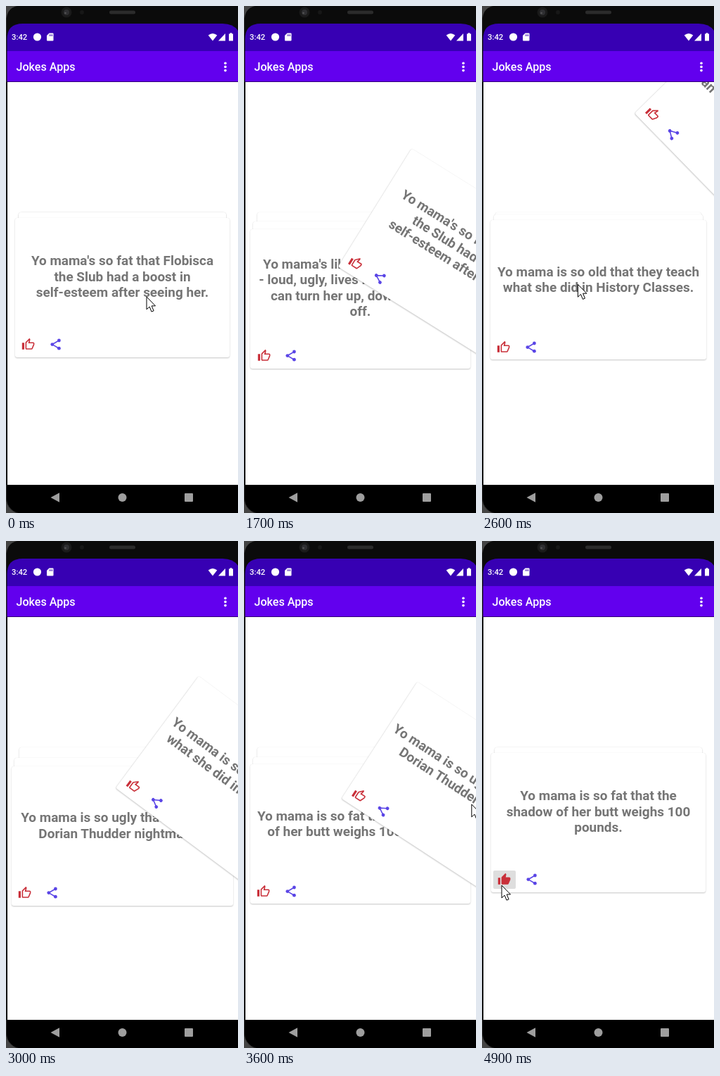
Animation, 330 px wide and 720 px high, one loop 5 s. Source, as an HTML page:

```html
<!DOCTYPE html>
<html lang="en">
<head>
<meta charset="utf-8">
<title>Joke cards</title>
<style>
  html, body { margin: 0; width: 100%; height: 100%; overflow: hidden; background: #444; }
  #stage { position: relative; width: 330px; height: 720px; overflow: hidden; font-family: Roboto, sans-serif; }
  #chrome, #cursor { position: absolute; left: 0; top: 0; overflow: visible; }
  #app { position: absolute; left: 1.5px; top: 107.5px; width: 328.5px; height: 572px; background: #fff; overflow: hidden; isolation: isolate; }
  /* deck shares the stage's coordinates */
  #deck { position: absolute; left: -1.5px; top: -107.5px; }
  .card {
    position: absolute; height: 198px; background: #fff; border-radius: 3px;
    box-shadow: 0 1px 2px rgba(0, 0, 0, .22), 0 0 1px rgba(0, 0, 0, .08);
  }
  .joke {
    position: absolute; left: 0; right: 0; top: 84.3px; transform: translateY(-50%);
    font-weight: 700; font-size: 18.95px; line-height: 22.5px;
    color: #757575; text-align: center; white-space: pre;
  }
  .card svg { position: absolute; top: 170.4px; width: 19.2px; height: 19.2px; }
  .like { left: 9.4px; fill: #c9303a; }
  .share { left: 48px; fill: #5a45e6; stroke: #5a45e6; }
  .press { position: absolute; left: 3px; top: 167px; width: 32px; height: 26px; border-radius: 2px; background: #dedede; visibility: hidden; }
</style>
</head>
<body>
<div id="stage">
  <svg id="chrome" width="330" height="720">
    <rect x=".5" y="-1" width="360" height="722" rx="22" stroke="#262626"/>
    <path d="M1 40V20Q1 0 21 0H330V40Z" fill="#0b0b0b"/>
    <circle cx="86" cy="9" r="7.5" fill="#1a1a1a"/>
    <circle cx="86" cy="9" r="4" fill="#2f2f32"/>
    <circle cx="84.5" cy="10" r="1.3" fill="#555"/>
    <circle cx="108" cy="9" r="3" fill="#171717"/>
    <rect x="147" y="6.5" width="37" height="5" rx="2.5" fill="#2b2b2b"/>
    <path d="M1.5 64V47Q1.5 25 24 25H308Q323 25 330 35V64Z" fill="#3700b3"/>
    <path d="M1.5 64H330V107.5H1.5Z" fill="#6200ee"/>
    <g fill="#fff" font-weight="500">
      <text x="8" y="48" font-size="11.3">3:42</text>
      <circle cx="44.5" cy="44" r="5.6"/>
      <path d="M61.5 38.5H66.5Q67.5 38.5 67.5 39.5V48.5Q67.5 49.5 66.5 49.5H59Q58 49.5 58 48.5V42Z"/>
      <path d="M62 40.3V42.8M63.8 40.3V42.8M65.6 40.3V42.8" stroke="#3700b3" stroke-width=".9"/>
      <path d="M287.7 41.5Q294 36.5 300.3 41.5L294 49.5Z"/>
      <path d="M302 49.5L312 39V49.5Z"/>
      <path d="M317 39.5H318.7V38.3H321.3V39.5H323V49.5H317Z"/>
      <text x="14.5" y="92" font-size="16.1">Jokes Apps</text>
      <circle cx="312" cy="81.2" r="1.8"/>
      <circle cx="312" cy="86.4" r="1.8"/>
      <circle cx="312" cy="91.6" r="1.8"/>
    </g>
    <g fill="#9e9e9e">
      <path d="M63.5 698L76 691.3V704.7Z"/>
      <circle cx="165.5" cy="698" r="6"/>
      <rect x="254" y="692" width="12" height="12" rx="1"/>
    </g>
  </svg>
  <div id="app"><div id="deck"></div></div>
  <svg id="cursor" width="14" height="23">
    <path d="M.5 .5V18.4L4.6 14.6 7.5 21.6 10.6 20.3 7.7 13.4H13Z" fill="#fff" stroke="#000"/>
  </svg>
</div>
<script>
const LOOP = 5000, STEP = 100;

const jokes = [
  "Yo mama's so fat that Flobisca\nthe Slub had a boost in\nself-esteem after seeing her.",
  "Yo mama's like a set of speakers\n- loud, ugly, lives in a box, and you\ncan turn her up, down, on, and\noff.",
  "Yo mama is so old that they teach\nwhat she did in History Classes.",
  "Yo mama is so ugly that she gives\nDorian Thudder nightmares.",
  "Yo mama is so fat that the\nshadow of her butt weighs 100\npounds.",
  "", ""
];
const wideJoke = "Yo mama is so fat that the shadow\nof her butt weighs 100 pounds.";
const lastCard = 4;

const thumbLine = "M9 21h9c.83 0 1.54-.5 1.84-1.22l3.02-7.05c.09-.23.14-.47.14-.73v-2c0-1.1-.9-2-2-2h-6.31l.95-4.57.03-.32c0-.41-.17-.79-.44-1.06L14.17 1 7.58 7.59C7.22 7.95 7 8.45 7 9v10c0 1.1.9 2 2 2zM9 9l4.34-4.34L12 10h9v2l-3 7H9V9zM1 9h4v12H1z";
const thumbFull = "M1 21h4V9H1v12zm22-11c0-1.1-.9-2-2-2h-6.31l.95-4.57.03-.32c0-.41-.17-.79-.44-1.06L14.17 1 7.59 7.59C7.22 7.95 7 8.45 7 9v10c0 1.1.9 2 2 2h9c.83 0 1.54-.5 1.84-1.22l3.02-7.05c.09-.23.14-.47.14-.73v-2z";

// reach: how far the card is dragged before it is flung
const swipes = [
  { start: 1500, end: 1900, reach: 150, pace: 1.5 },
  { start: 2100, end: 2700, reach: 172, pace: 1 },
  { start: 2700, end: 3300, reach: 172, pace: 1 },
  { start: 3300, end: 3800, reach: 155, pace: 1 }
];

// Left and top of each place in the deck, at rest and with the top card dragged away.
const rest = [[13, 301], [18, 293], [19, 293], [19, 293]];
const lifted = [[8, 320], [12, 308], [19, 293]];

// Time, x, y where the pointer turns or stops.
const stops = [
  [0, 200, 413], [200, 200, 413], [600, 89, 385], [900, 85, 385], [1500, 268, 395],
  [1900, 113, 398], [3600, 113, 398], [3800, 261, 360], [4300, 23, 491],
  [4400, 23, 491], [4500, 28, 489], [LOOP, 28, 489]
];

const lerp = (a, b, k) => a + (b - a) * k;
const mix = (a, b, k) => a.map((v, i) => lerp(v, b[i], k));

const cards = jokes.map((joke, i) => {
  const el = document.createElement("div");
  el.className = "card";
  el.style.zIndex = jokes.length - i;
  el.innerHTML = `<div class="joke">${joke}</div><div class="press"></div>
    <svg class="like" viewBox="0 0 24 24"><path d="${thumbLine}"/></svg>
    <svg class="share" viewBox="0 0 24 24"><path d="M18 5L6 12L18 19" fill="none" stroke-width="2"/>
    <g stroke="none"><circle cx="18" cy="5" r="3"/><circle cx="6" cy="12" r="3"/><circle cx="18" cy="19" r="3"/></g></svg>`;
  document.getElementById("deck").append(el);
  return el;
});
const cursor = document.getElementById("cursor");
const lastJoke = cards[lastCard].querySelector(".joke");
const press = cards[lastCard].querySelector(".press");
const thumb = cards[lastCard].querySelector(".like path");

// A cubic drag for three steps, then a straight fling for two.
function swipeAt(t) {
  const now = swipes.find(s => t >= s.start && t < s.end);
  if (!now) return { drag: 0, fling: 0 };
  const step = (t - now.start) / STEP * now.pace;
  return {
    drag: now.reach * Math.min(1, step / 3) ** 3,
    fling: Math.max(0, (step - 3) / 2)
  };
}

function place(el, [x, y], move = "none") {
  Object.assign(el.style, {
    left: x + "px", top: y + "px", width: 331 - 2 * x + "px", transform: move, visibility: "visible"
  });
}

function drawDeck(t, { drag, fling }) {
  const top = swipes.filter(s => t >= s.end).length;
  const lift = Math.min(1, drag / 172) * (1 - .82 * fling);
  const x = drag + 57 * fling, y = -.22 * drag - 170 * fling, angle = .213 * drag + 9 * fling;

  cards.forEach((el, i) => {
    const depth = i - top;
    if (depth < 0 || depth > 3) { el.style.visibility = "hidden"; return; }
    if (depth === 0) return place(el, rest[0], `translate(${x}px,${y}px) rotate(${angle}deg)`);
    const from = rest[fling ? depth - 1 : depth];
    place(el, mix(from, lifted[depth - 1], lift));
  });
  const wide = lastCard - top === 1 && lift > .3;
  lastJoke.textContent = wide ? wideJoke : jokes[lastCard];
}

function drawCursor(t, { drag, fling }) {
  const i = stops.findIndex(s => s[0] > t);
  const a = stops[i - 1], b = stops[i];
  const [, x, y] = mix(a, b, ((t - a[0]) / (b[0] - a[0])) ** 2);
  const pull = drag * (1 - .9 * fling);
  cursor.style.transform = `translate(${x + 1.36 * pull - .5}px,${y - .155 * pull - .5}px)`;
}

function draw(t) {
  const swipe = swipeAt(t);
  drawDeck(t, swipe);
  drawCursor(t, swipe);
  press.style.visibility = t >= 4800 ? "visible" : "hidden";
  thumb.setAttribute("d", t >= 4900 ? thumbFull : thumbLine);
}

const begin = performance.now();
function frame() {
  const t = (performance.now() - begin) % LOOP;
  draw(Math.floor(t / STEP) * STEP);
  requestAnimationFrame(frame);
}
frame();
</script>
</body>
</html>
```
